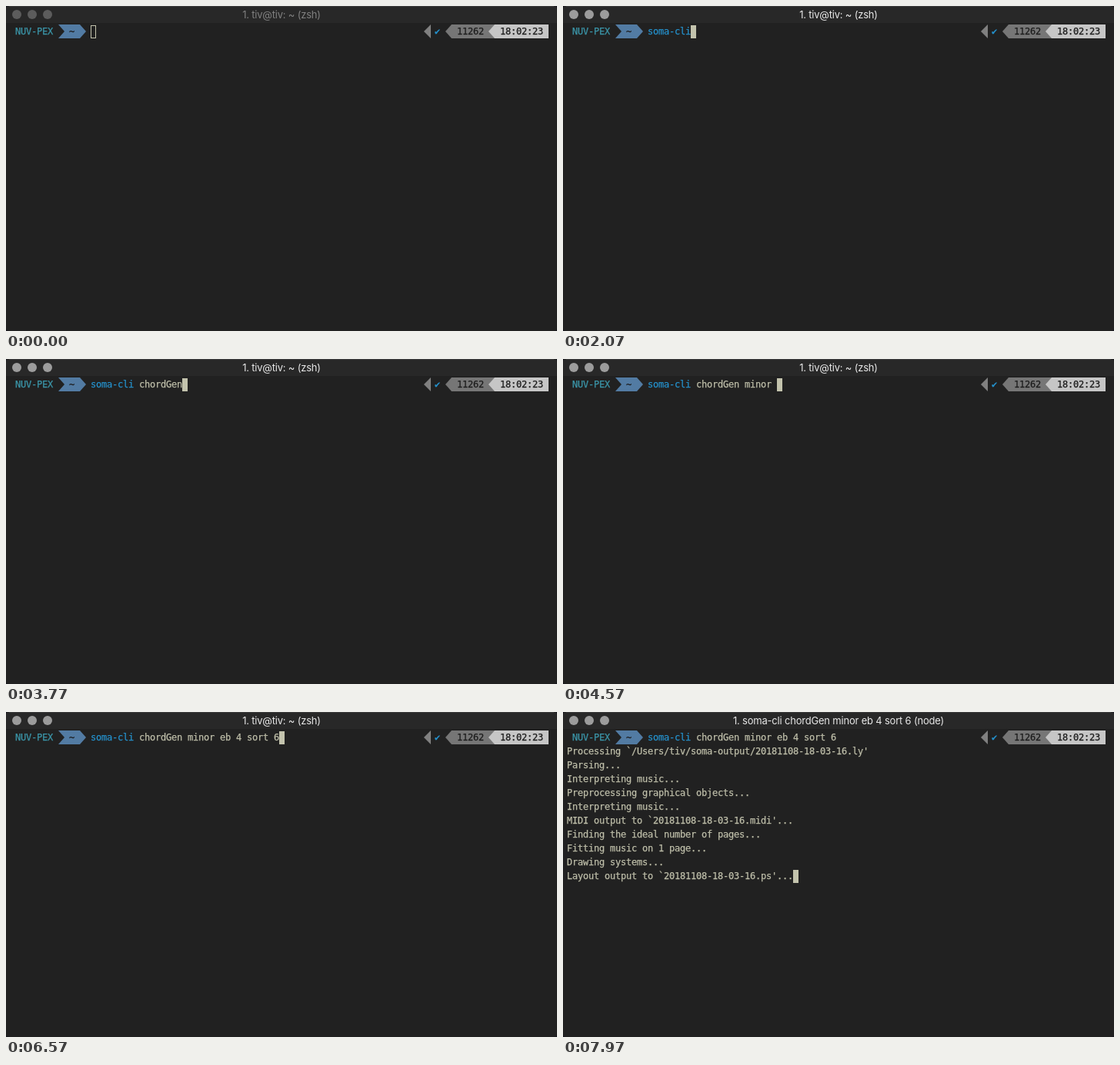
An HTML page that plays this animation: 716 px wide and 422 px high, repeating every 8000 ms.

```html
<!DOCTYPE html>
<html lang="en">
<head>
<meta charset="utf-8">
<title>Terminal</title>
<style>
  html, body { margin: 0; width: 100%; height: 100%; overflow: hidden; background: #17171f; }
  svg { display: block; width: 716px; height: 422px; }
  text { white-space: pre; }
  .mono { font: 12px "DejaVu Sans Mono", monospace; letter-spacing: -.224px; stroke-width: .25px; }
  .title { font: 13px Inter, sans-serif; letter-spacing: -.2px; text-anchor: middle; }
</style>
</head>
<body>
<svg id="stage" viewBox="0 0 716 422"></svg>
<script>
const LOOP = 8000, CELL = 7, ROW = 18, LEFT = 5, TOP = 24, PROMPT = 110;
const INK = '#bebea9', CURSOR = '#c3c3ad', BLUE = '#2591cc', DARK = '#1c1c1c';
const FOCUS = 270, ENTER = 7040, RUN = 7090;

const command = 'soma-cli chordGen minor eb 4 sort 6';
const keys = [
  1170, 1270, 1365, 1500, 1620, 1760, 1860, 1960,
  2080, 2270, 2400, 2500, 2620, 2790, 3300, 3450, 3570, 3790,
  4030, 4130, 4220, 4310, 4420, 4530, 4700, 4800, 4870,
  5030, 5250, 5700, 5870, 5940, 6020, 6100, 6270
];

const stamp = '20181108-18-03-16';
const output = [
  [7720, 'Processing `/Users/tiv/soma-output/' + stamp + ".ly'"],
  [7720, 'Parsing...'],
  [7780, 'Interpreting music...'],
  [7840, 'Preprocessing graphical objects...'],
  [7930, 'Interpreting music...'],
  [7930, 'MIDI output to `' + stamp + ".midi'..."],
  [7965, 'Finding the ideal number of pages...'],
  [7965, 'Fitting music on 1 page...'],
  [7965, 'Drawing systems...'],
  [7965, 'Layout output to `' + stamp + ".ps'..."]
];

const stage = document.getElementById('stage');

function add(tag, attrs, content = '') {
  const el = document.createElementNS('http://www.w3.org/2000/svg', tag);
  for (const k in attrs) el.setAttribute(k, attrs[k]);
  el.textContent = content;
  stage.append(el);
  return el;
}
const mono = (x, row, fill, content) =>
  add('text', { x, y: TOP + 13 + row * ROW, class: 'mono', fill, stroke: fill }, content);
const shape = (d, fill) => add('path', { d, fill });
const show = (el, on) => el.setAttribute('visibility', on ? 'visible' : 'hidden');

// Window
add('rect', { width: 716, height: 422, rx: 4, fill: '#212121' });
shape('M0 22V4Q0 0 4 0H712Q716 0 716 4V22Z', '#282828');
shape('M4 0H712V1H4Z', '#3c3c3c');
const lights = [14, 34, 54].map(cx => add('circle', { cx, cy: 11, r: 6 }));
const title = add('text', { x: 358, y: 16, class: 'title' });

// Prompt
mono(12, 0, '#3b95a8', 'NUV-PEX');
shape('M68 24H96L104 33L96 42H68L76 33Z', '#527ba3');
mono(82, 0, DARK, '~');
shape('M552 24V42L543 33Z', '#808080');
mono(557, 0, BLUE, '✔');
shape('M579 24H635V42H579L571 33Z', '#767676');
mono(586, 0, DARK, '11262');
shape('M635 24H705V42H635L627 33Z', '#c6c6c6');
mono(642, 0, DARK, '18:02:23');

// Typed line, output and cursor
const head = mono(PROMPT, 0, BLUE);
const tail = mono(PROMPT + 8 * CELL, 0, INK);
const underline = add('rect', { x: PROMPT, y: 39, height: 1, fill: INK });
const lines = output.map(([, s], i) => mono(LEFT, i + 1, INK, s));
const cursor = add('rect', { stroke: CURSOR });

function render(t) {
  const focused = t >= FOCUS;
  lights.forEach(c => c.setAttribute('fill', focused ? '#9c9c9c' : '#5c5c5c'));
  title.setAttribute('fill', focused ? '#e8e8e8' : '#808080');
  title.textContent = t < RUN ? '1. tiv@tiv: ~ (zsh)' : `1. ${command} (node)`;

  const count = keys.filter(k => k <= t).length;
  const word = command.slice(0, Math.min(count, 8));
  const known = count >= 8;
  head.textContent = word;
  head.setAttribute('fill', known ? BLUE : INK);
  head.setAttribute('stroke', known ? BLUE : 'none');
  tail.textContent = command.slice(8, count);
  underline.setAttribute('width', count < 6 ? count * CELL : 0);

  const printed = output.filter(([at]) => at <= t).length;
  lines.forEach((el, i) => show(el, i < printed));

  let x = PROMPT + count * CELL, row = 0;
  if (t >= ENTER) {
    row = Math.max(1, printed);
    x = LEFT + (printed ? output[printed - 1][1].length * CELL : 0);
  }
  cursor.setAttribute('x', x + .5);
  cursor.setAttribute('y', TOP + 1.5 + row * ROW);
  cursor.setAttribute('width', CELL - 1);
  cursor.setAttribute('height', 16);
  cursor.setAttribute('fill', focused ? CURSOR : 'none');
}

const start = performance.now();
function tick() {
  render((performance.now() - start) % LOOP);
  requestAnimationFrame(tick);
}
tick();
</script>
</body>
</html>
```
